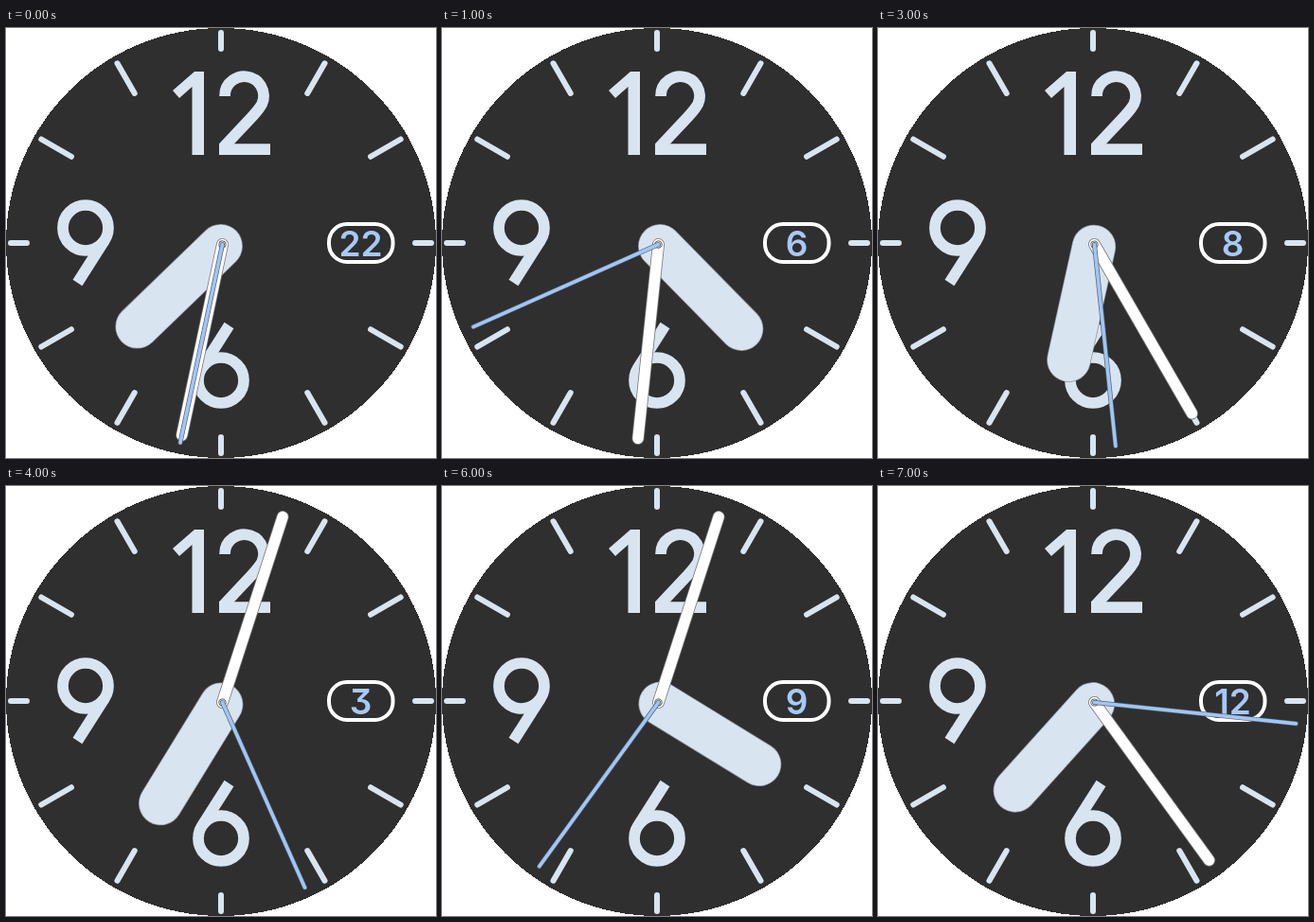
An HTML page that plays this animation: 454x454 px, repeating every 8000 ms.

```html
<!DOCTYPE html>
<html lang="en">
<head>
<meta charset="utf-8">
<title>Watch face</title>
<style>
  html, body { margin: 0; width: 100%; height: 100%; overflow: hidden; background: #fff; }
  svg { display: block; width: 100vw; height: 100vh; }
  #date { font: 600 37px Inter, Roboto, sans-serif; font-feature-settings: "cv09"; fill: #a6c9f8; text-anchor: middle; }
</style>
</head>
<body>
<svg viewBox="0 0 454 454">
  <circle cx="227" cy="227" r="227" fill="#2f2f2f" shape-rendering="crispEdges"/>
  <g id="ticks" stroke="#d9e4f1" stroke-width="6" stroke-linecap="round"/>

  <g fill="none" stroke="#d9e4f1" stroke-width="11.7">
    <path d="M176 66L199 46H209V134H196.500V62L183 74Z" fill="#d9e4f1" stroke="none"/>
    <path d="M231 72A20.500 20.500 0 1 1 267.500 84.500Q265 88 260 93.500L229 126.500"/>
    <path d="M225 128.200H279"/>
    <g id="nine">
      <circle cx="84" cy="211" r="24"/>
      <path d="M75.500 269L103.500 225"/>
    </g>
    <use href="#nine" transform="rotate(180 155.500 291.500)"/>
  </g>

  <g id="hour" stroke-linecap="round">
    <path d="M0 -2.500V-125" stroke="#8d939b" stroke-width="46.500"/>
    <path d="M0 -2.500V-125" stroke="#d9e4f1" stroke-width="45"/>
  </g>

  <rect x="341" y="207" width="67.500" height="40" rx="19" fill="#2f2f2f" stroke="#fff" stroke-width="4"/>
  <text id="date" x="374.500" y="240.500"></text>

  <g id="minute" stroke-linecap="round">
    <path d="M0 0V-206" stroke="#777" stroke-width="13"/>
    <path d="M0 0V-206" stroke="#fff" stroke-width="11.400"/>
  </g>

  <g id="second" stroke-linecap="round">
    <circle r="3.600" fill="#fff" stroke="#666" stroke-width="1"/>
    <path d="M0 0V-214" stroke="#55606d" stroke-width="5"/>
    <path d="M0 0V-214" stroke="#a0c6f6" stroke-width="3.600"/>
  </g>
</svg>
<script>
const $ = id => document.getElementById(id);
const STEP = 1000;

// hour, minute, second, day
const times = [
  [7, 32, 32, 22],
  [4, 31, 41, 6],
  [2, 18, 27, 20],
  [6, 25, 29, 8],
  [7, 3, 26, 3],
  [11, 12, 53, 15],
  [4, 3, 36, 9],
  [7, 24, 16, 12]
];

function addTicks() {
  for (let i = 0; i < 12; i++) {
    const main = i % 3 === 0;
    const tick = document.createElementNS("http://www.w3.org/2000/svg", "path");
    tick.setAttribute("d", main ? "M0 -222V-205" : "M0 -219V-182.500");
    tick.setAttribute("transform", `translate(227 227) rotate(${i * 30})`);
    $("ticks").append(tick);
  }
}

function turn(id, angle) {
  $(id).setAttribute("transform", `translate(228.500 228.500) rotate(${angle})`);
}

let shown = -1;
function draw(ms) {
  const i = Math.floor(ms / STEP) % times.length;
  if (i === shown) return;
  shown = i;
  const [h, m, s, day] = times[i];
  turn("hour", h * 30 + m / 2);
  turn("minute", m * 6);
  turn("second", s * 6);
  $("date").textContent = day;
}

addTicks();
draw(0);
const start = performance.now();
function loop() {
  draw(performance.now() - start);
  requestAnimationFrame(loop);
}
requestAnimationFrame(loop);
</script>
</body>
</html>
```
